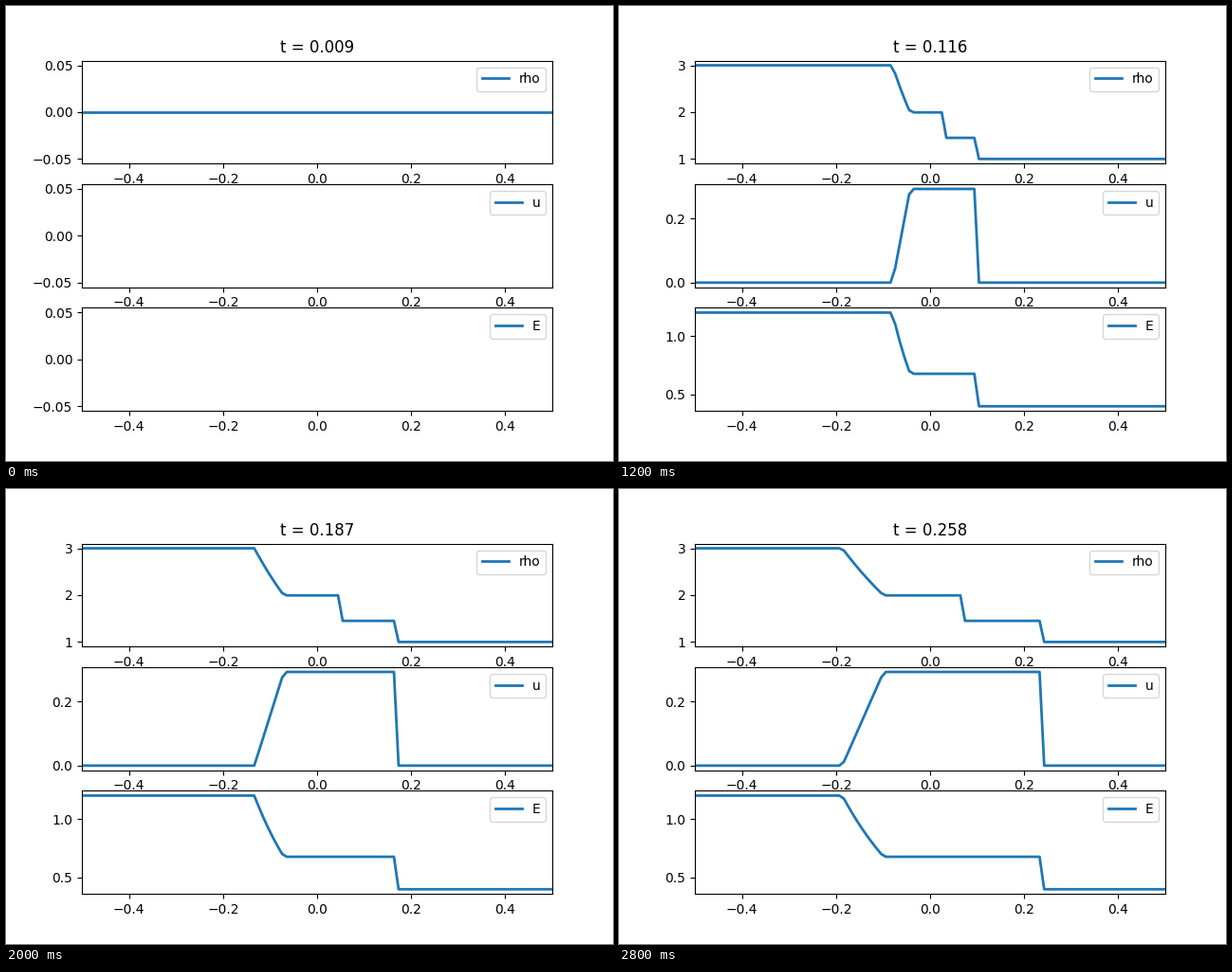
Write a matplotlib script that moves like this. It is 640 by 480 pixels and loops after 2.9 s.

```python
import numpy as np
import matplotlib.pyplot as plt
from matplotlib.animation import FuncAnimation

# Shock tube: exact Riemann solution of the 1D Euler equations
GAMMA = 1.4
RHO_L, P_L = 3.0, 1.2
RHO_R, P_R = 1.0, 0.4
C_L = np.sqrt(GAMMA * P_L / RHO_L)
C_R = np.sqrt(GAMMA * P_R / RHO_R)

FRAMES = 29
CELLS = 101
DT = 0.9 / CELLS
x = np.linspace(-0.5, 0.5, CELLS + 1)


def fan_velocity(p):
    """Velocity behind the left rarefaction."""
    return 2 * C_L / (GAMMA - 1) * (1 - (p / P_L) ** ((GAMMA - 1) / (2 * GAMMA)))


def shock_velocity(p):
    """Velocity behind the right shock."""
    a = 2 / ((GAMMA + 1) * RHO_R)
    b = (GAMMA - 1) / (GAMMA + 1) * P_R
    return (p - P_R) * np.sqrt(a / (p + b))


def star_pressure():
    low, high = P_R, P_L
    for _ in range(60):
        mid = (low + high) / 2
        if fan_velocity(mid) > shock_velocity(mid):
            low = mid
        else:
            high = mid
    return (low + high) / 2


P_STAR = star_pressure()
U_STAR = fan_velocity(P_STAR)
RHO_FAN = RHO_L * (P_STAR / P_L) ** (1 / GAMMA)
RATIO = P_STAR / P_R
G = (GAMMA - 1) / (GAMMA + 1)
RHO_SHOCK = RHO_R * (RATIO + G) / (G * RATIO + 1)
TAIL = U_STAR - np.sqrt(GAMMA * P_STAR / RHO_FAN)
SHOCK = C_R * np.sqrt((GAMMA + 1) / (2 * GAMMA) * RATIO + (GAMMA - 1) / (2 * GAMMA))


def solution(t):
    """Density, velocity and pressure on the grid at time t > 0."""
    s = x / t
    c = np.clip(2 / (GAMMA + 1) * C_L - G * s, 0.01, None)
    regions = [s < -C_L, s < TAIL, s < U_STAR, s < SHOCK]
    rho = np.select(
        regions,
        [RHO_L, RHO_L * (c / C_L) ** (2 / (GAMMA - 1)), RHO_FAN, RHO_SHOCK],
        RHO_R)
    u = np.select(regions, [0, 2 / (GAMMA + 1) * (C_L + s), U_STAR, U_STAR], 0)
    p = np.select(
        regions,
        [P_L, P_L * (c / C_L) ** (2 * GAMMA / (GAMMA - 1)), P_STAR, P_STAR],
        P_R)
    return rho, u, p


fig, axes = plt.subplots(3, 1, figsize=(6.4, 4.8), dpi=100)
lines = []
for ax, name in zip(axes, ("rho", "u", "E")):
    lines += ax.plot(x, np.zeros_like(x), lw=2, label=name)
    ax.set_xlim(-0.5, 0.5)
    ax.legend(loc="upper right")
title = axes[0].set_title("")


def draw(i):
    title.set_text(f"t = {(i + 1) * DT:.3f}")
    if i == 0:
        # empty state: flat density, undefined velocity and energy
        fields = [np.zeros_like(x)] + [np.full_like(x, np.nan)] * 2
    else:
        fields = solution(i * DT)
    for ax, line, y in zip(axes, lines, fields):
        line.set_ydata(y)
        if i == 0:
            ax.set_ylim(-0.055, 0.055)
        else:
            pad = 0.05 * (y.max() - y.min())
            ax.set_ylim(y.min() - pad, y.max() + pad)
    return [*lines, title]


anim = FuncAnimation(fig, draw, frames=FRAMES, interval=100, repeat=True,
                     repeat_delay=0, blit=False)
plt.show()
```
